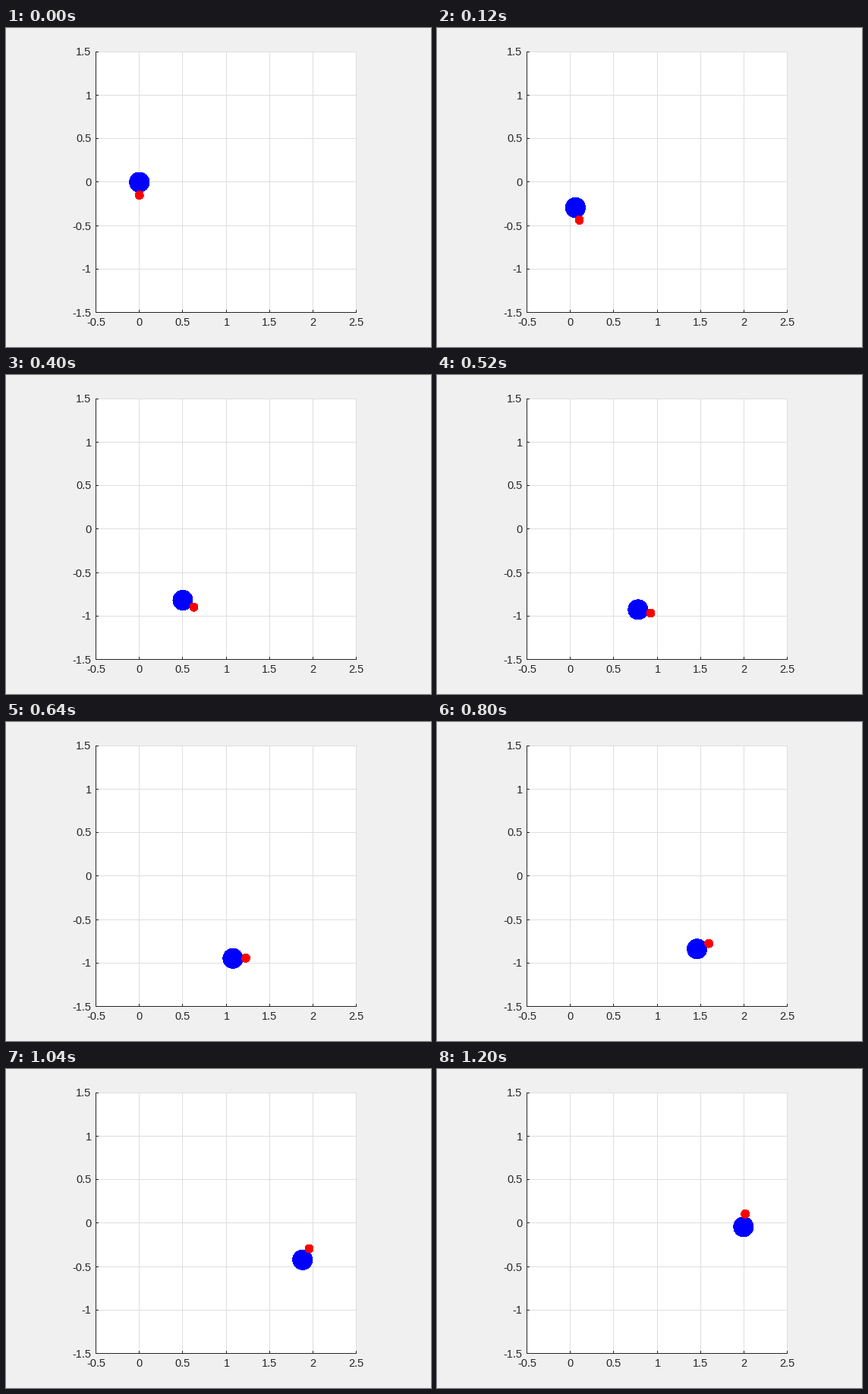
Write a matplotlib script that moves like this. It is 560 by 420 pixels and loops after 1240 ms.

```python
import numpy as np
import matplotlib.pyplot as plt
from matplotlib.animation import FuncAnimation
from matplotlib.patches import Circle, Rectangle

W, H, DPI = 560, 420, 100
LEFT, TOP, SIDE = 118, 31, 343      # plot area in pixels
UNIT = SIDE / 3                     # pixels per data unit
FRAMES, INTERVAL = 31, 40
STEP, TURN, REACH = 0.1, 0.1, 0.15
INK, GRID = "#262626", "#dedede"

fig = plt.figure(figsize=(W / DPI, H / DPI), dpi=DPI, facecolor="#f0f0f0")
ax = fig.add_axes([0, 0, 1, 1])
ax.set_xlim(0, W)
ax.set_ylim(H, 0)
ax.axis("off")


def bar(x, y, w, h, color, z):
    ax.add_patch(Rectangle((x, y), w, h, fc=color, lw=0, aa=False, zorder=z))


def label(x, baseline, value, ha):
    ax.text(x, baseline, f"{value:g}", ha=ha, va="baseline", color=INK,
            family="Liberation Sans", fontsize=14.5 * 72 / DPI)


def to_pixels(x, y):
    return LEFT + 0.5 + (x + 0.5) * UNIT, TOP + 0.5 + (1.5 - y) * UNIT


bar(LEFT, TOP, SIDE + 1, SIDE + 1, "white", 0)
for i in range(7):
    offset = int(i * UNIT / 2 + 0.5)
    x, y = LEFT + offset, TOP + int(i * UNIT / 2 + 0.49)
    bar(x, TOP, 1, SIDE + 1, GRID, 1)
    bar(LEFT, y, SIDE + 1, 1, GRID, 1)
    bar(x, TOP + SIDE - 3, 1, 4, INK, 2)
    bar(LEFT, y, 4, 1, INK, 2)
    label(x + 0.5, 391.5, i / 2 - 0.5, "center")
    label(112.5, y + 5.5, 1.5 - i / 2, "right")
bar(LEFT, TOP, 1, SIDE + 1, INK, 2)
bar(LEFT, TOP + SIDE, SIDE + 1, 1, INK, 2)

body = ax.add_patch(Circle((0, 0), 13, fc="blue", lw=0, aa=False, zorder=4))
nose = ax.add_patch(Circle((0, 0), 5.4, fc="red", lw=0, aa=False, zorder=5))


def draw(k):
    # turn first, then move one step along the new heading
    headings = -np.pi / 2 + TURN * np.arange(1, k + 1)
    x = STEP * np.cos(headings).sum()
    y = STEP * np.sin(headings).sum()
    heading = -np.pi / 2 + TURN * k
    body.center = to_pixels(x, y)
    nose.center = to_pixels(x + REACH * np.cos(heading),
                            y + REACH * np.sin(heading))
    return body, nose


anim = FuncAnimation(fig, draw, frames=FRAMES, interval=INTERVAL,
                     repeat=True, repeat_delay=0)
plt.show()
```
